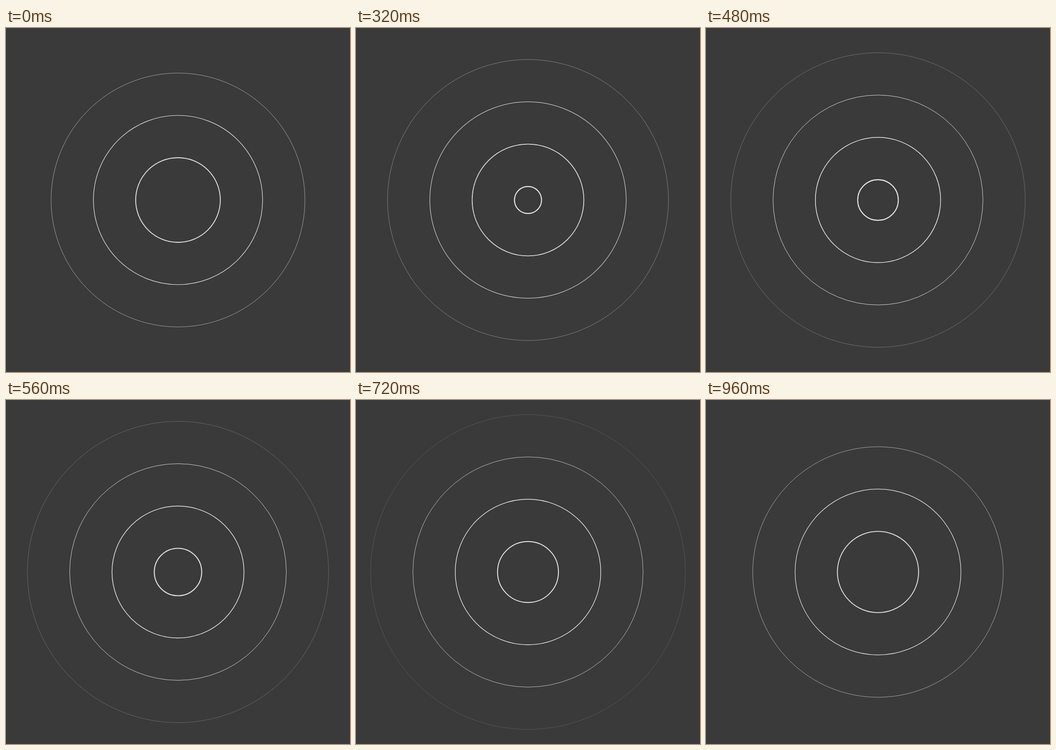
These frames come from a looping animation (748x748 px, 1 s). An HTML page:

```html
<!DOCTYPE html>
<html lang="en">
<head>
<meta charset="utf-8">
<title>Expanding rings</title>
<style>
  html, body { margin: 0; width: 100%; height: 100%; overflow: hidden; background: #3a3a3a; }
  svg { display: block; width: 100%; height: 100%; }
</style>
</head>
<body>
<svg id="stage" viewBox="0 0 748 748" fill="none" stroke="#e8e8e8"></svg>
<script>
  const LOOP = 1000, STEP = 40;
  const COUNT = 4, GAP = 92, THIN = 0.6;
  const stage = document.getElementById("stage");

  const rings = Array.from({ length: COUNT }, () => {
    const ring = document.createElementNS("http://www.w3.org/2000/svg", "circle");
    ring.setAttribute("cx", 374);
    ring.setAttribute("cy", 374);
    return stage.appendChild(ring);
  });

  // Each ring grows by one gap per loop and thins out to nothing at the rim.
  function draw(ms) {
    const phase = Math.floor((ms % LOOP) / STEP) * STEP / LOOP;
    rings.forEach((ring, i) => {
      const age = i + phase;
      ring.setAttribute("r", GAP * age);
      ring.setAttribute("stroke-width", THIN * (COUNT - age));
    });
  }

  const start = performance.now();
  function tick() {
    draw(performance.now() - start);
    requestAnimationFrame(tick);
  }
  draw(0);
  requestAnimationFrame(tick);
</script>
</body>
</html>
```
